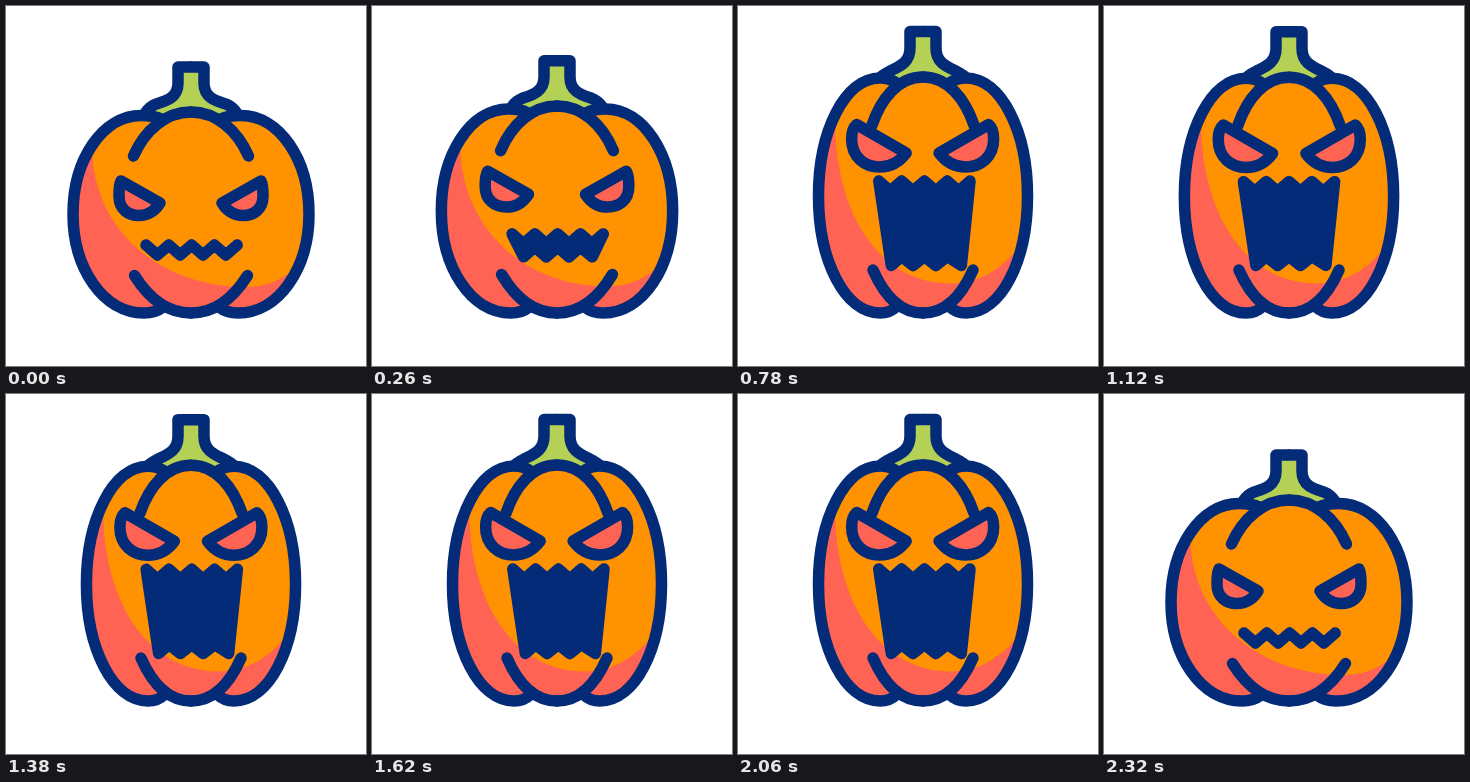
An HTML page that plays this animation: 360 px wide and 360 px high, repeating every 2520 ms.

```html
<!DOCTYPE html>
<html lang="en">
<head>
<meta charset="utf-8">
<title>Pumpkin</title>
<style>
  html, body { margin: 0; width: 100%; height: 100%; overflow: hidden; background: #fff; }
  svg { display: block; width: 100vw; height: 100vh; }
  .line { fill: none; stroke: #042b78; stroke-width: 11.5; stroke-linecap: round; stroke-linejoin: round; }
  .eye { fill: #ff6354; }
  .mouth { fill: #042b78; }
</style>
</head>
<body>
<svg viewBox="0 0 360 360">
  <defs>
    <clipPath id="body">
      <path id="bodyHalf" data-shape="body"/>
      <use href="#bodyHalf" transform="matrix(-1 0 0 1 370 0)"/>
    </clipPath>
    <g id="stem">
      <path data-shape="stemFill" fill="#b5d155"/>
      <path data-shape="stem" class="line"/>
    </g>
    <g id="ribs">
      <path data-shape="side" class="line"/>
      <path data-shape="dome" class="line"/>
      <path data-shape="base" class="line"/>
    </g>
    <path id="eye" data-shape="eye" class="line eye"/>
  </defs>
  <use href="#stem"/>
  <use href="#stem" transform="matrix(-1 0 0 1 370 0)"/>
  <g clip-path="url(#body)">
    <path d="M0 0H360V360H0Z" fill="#ff6354"/>
    <path data-shape="light" fill="#ff9200"/>
  </g>
  <use href="#ribs"/>
  <use href="#ribs" transform="matrix(-1 0 0 1 370 0)"/>
  <g id="eyes">
    <use href="#eye"/>
    <use href="#eye" transform="matrix(-1 0 0 1 370 0)"/>
  </g>
  <path id="mouth" data-shape="mouth" class="line mouth"/>
</svg>
<script>
const LOOP = 2520, OPEN = 200, CLOSE = 2090, MOVE = 230, SHAKE = 140;

// Each shape: closed pose, open pose. Symmetric parts hold the left half only.
const shapes = {
  side: [
    'M155 113C149 110 142 109.5 135 109.5C97 109.5 67 153 67 208C67 262 97 307 138 307C146 307 152 305 157 301',
    'M157 76C152 73 146 72 142 72C107 72 80.5 125 80.5 190C80.5 255 107 307 142 307C149 307 154 305 158 301'],
  dome: [
    'M127.5 150C139 124 160 106 185 106',
    'M134 119C143 93 160 71 185 71'],
  base: [
    'M128.5 269.5C142 291 160 307 185 307',
    'M135 264C146 289 161 307 185 307'],
  stem: [
    'M185 61L172 61L172 77C172 92 160 95 150 98C145 100 142 103 140 106',
    'M185 25.5L172 25.5L172 42C172 57 161 60.5 152 65C147 67.5 144 69 142 72'],
  eye: [
    'M115 175L154 197C149 205 142 209.5 133 209.5C122 209.5 113 203 113 190C113 184 113 179 115 175Z',
    'M119 118.5L168.5 147C161 157 152 161 142 161C127 161 114 151 114 133C114 126 115 122 119 118.5Z'],
  light: [
    'M86 140C86 225 155 281 240 281C262 281 278 273 295 258L320 20L86 20Z',
    'M97 115C98 218 148 277.5 212 277.5C238 277.5 258 267 277 246L320 20L97 20Z']
};
const tails = {
  body: ['side', 'C166 306 175 307 186 307L186 106C175 106 164 109 155 113Z',
                 'C166 306 175 307 186 307L186 71C175 71 165 73 157 76Z'],
  stemFill: ['stem', 'L186 112L186 61Z', 'L186 76L186 25Z']
};
for (const [name, [from, ...ends]] of Object.entries(tails))
  shapes[name] = ends.map((end, i) => shapes[from][i] + end);

// Teeth: nine points above, seven below that meet them when shut.
function teeth(topY, lowX, lowY, depth) {
  const top = Array.from({ length: 9 }, (_, i) => [140 + i * 11.4, topY + (i % 2 ? 10 : 0)]);
  const low = Array.from({ length: 7 }, (_, i) =>
    [i === 0 ? lowX[0] : i === 6 ? lowX[1] : 151.4 + i * 11.4, lowY - (i % 2 ? depth : 0)]);
  return 'M' + top.concat(low.reverse()).map(p => p.join(' ')).join('L') + 'Z';
}
shapes.mouth = [teeth(239, [151.4, 219.8], 249, 10), teeth(175, [152.5, 222.5], 259.5, 9)];

const mix = ([a, b], p) => {
  const to = b.match(/[\d.]+/g);
  let i = 0;
  return a.replace(/[\d.]+/g, n => (+n + (to[i++] - n) * p).toFixed(2));
};
const ease = x => { x = Math.min(1, Math.max(0, x)); return x * x * (3 - 2 * x); };
const parts = [...document.querySelectorAll('[data-shape]')];
const eyes = document.getElementById('eyes'), mouth = document.getElementById('mouth');

function draw(now) {
  const t = now % LOOP;
  const open = ease((t - OPEN) / MOVE) - ease((t - CLOSE) / MOVE);
  const wave = Math.cos((t - 790) / SHAKE * 2 * Math.PI);
  const pose = open * (1 - 0.006 * (1 - wave));
  for (const part of parts) part.setAttribute('d', mix(shapes[part.dataset.shape], pose));
  const sway = open * wave;
  eyes.setAttribute('transform', `translate(${-0.4 * sway} 0)`);
  mouth.setAttribute('transform', `translate(${0.9 * sway} 0)`);
  requestAnimationFrame(draw);
}
draw(performance.now());
</script>
</body>
</html>
```
